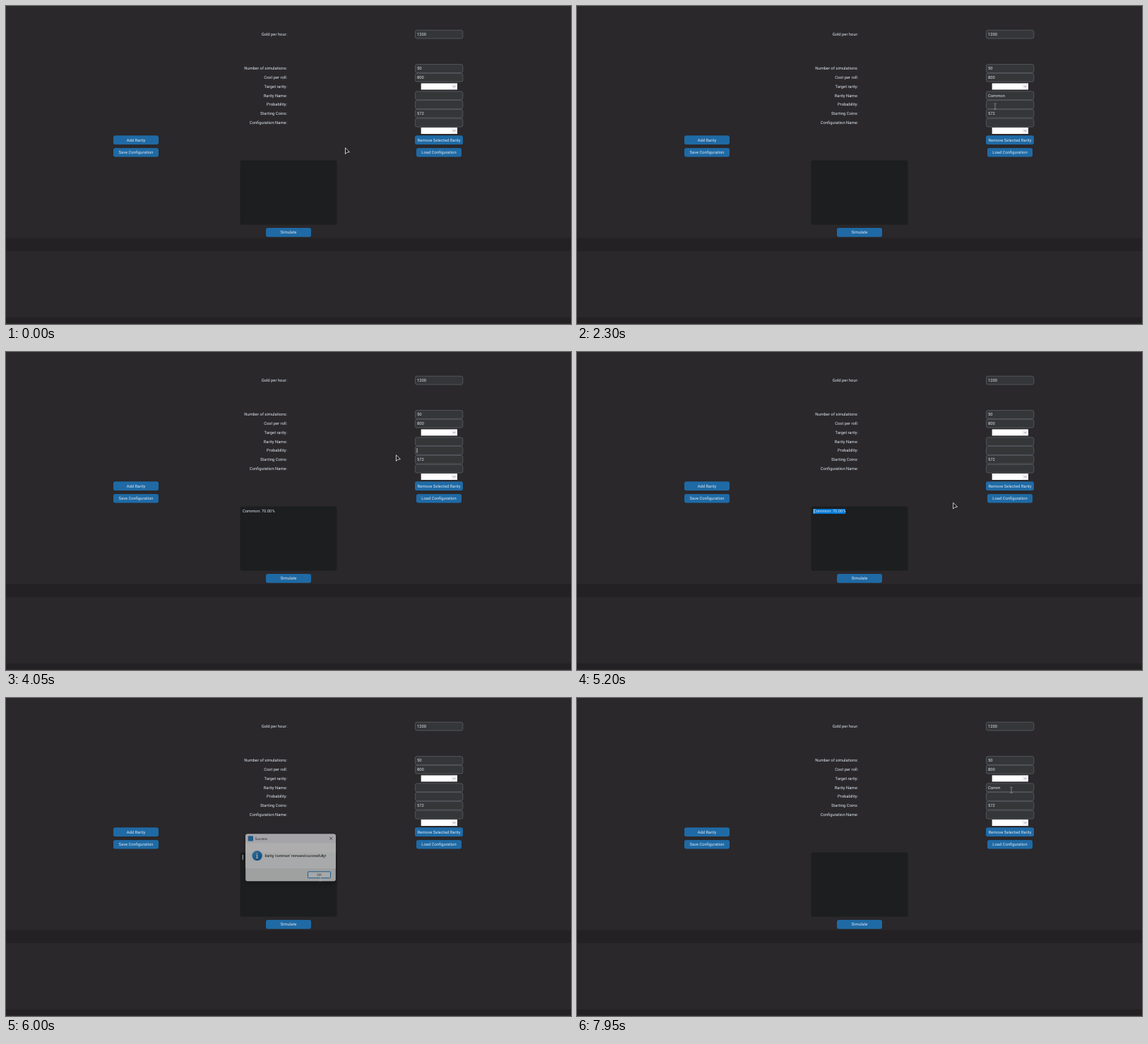
An HTML page for the animation above (8000 ms loop, 800x450 px).

```html
<!DOCTYPE html>
<html lang="en">
<head>
<meta charset="utf-8">
<title>Roll simulator</title>
<style>
html, body { margin: 0; width: 100%; height: 100%; overflow: hidden; background: #2a282b; }
svg { display: block; width: 100vw; height: 100vh; }
text { font: 5.83px Roboto, sans-serif; fill: #dce4ee; text-rendering: geometricPrecision; white-space: pre; }
#dialog text { font: 4.9px "Open Sans", sans-serif; fill: #1a1a1a; }
#dialog .info { font: bold 10px "Noto Serif", serif; fill: #fff; }
</style>
</head>
<body>
<svg viewBox="0 0 800 450" xmlns="http://www.w3.org/2000/svg">
  <defs>
    <linearGradient id="blue" x1="0" y1="0" x2="1" y2="1">
      <stop offset="0" stop-color="#3aa0e6"/><stop offset="1" stop-color="#0a5fae"/>
    </linearGradient>
    <filter id="soft" x="-20%" y="-30%" width="140%" height="170%"><feGaussianBlur stdDeviation="3.5"/></filter>
  </defs>
  <rect width="800" height="450" fill="#2a282b"/>
  <rect y="328.5" width="800" height="18.5" fill="#232124"/>
  <rect y="440.5" width="800" height="9.5" fill="#232124"/>
  <rect y="449" width="800" height="1" fill="#302d2d"/>
  <g id="form"></g>
  <rect x="331.5" y="218.6" width="137" height="90.8" rx="2.7" fill="#1c1e1f"/>
  <rect id="mark" x="335" y="222" width="45" height="7" fill="#0078d7"/>
  <text id="item" x="335" y="227.4">Common: 70.00%</text>
  <text id="name" x="582" y="128.8"></text>
  <text id="prob" x="582" y="141.6"></text>
  <rect id="caret" width=".8" height="6.8" fill="#dce4ee"/>
  <g id="dialog">
    <rect x="338.5" y="195" width="129" height="67" rx="3" fill="#000" opacity=".5" filter="url(#soft)"/>
    <rect x="338.4" y="192" width="129.2" height="67.6" rx="2.8" fill="#f0f0f0"/>
    <path d="M338.4 205V194.8a2.8 2.8 0 0 1 2.8-2.8h123.6a2.8 2.8 0 0 1 2.8 2.8V205z" fill="#f3f1f6"/>
    <rect x="338.4" y="205" width="129.2" height="36.2" fill="#fff"/>
    <rect x="342" y="194.8" width="7.4" height="7.4" rx="1" fill="#1d7cc4"/>
    <text x="352" y="200.3">Success</text>
    <path d="M458.8 196.2l4.2 4.2m0-4.2l-4.2 4.2" stroke="#222" stroke-width=".7"/>
    <circle cx="355" cy="223.2" r="7.2" fill="url(#blue)"/>
    <text class="info" x="355" y="226.9" text-anchor="middle">i</text>
    <text x="366" y="225.1" stroke="#1a1a1a" stroke-width=".12">Rarity 'common' removed successfully!</text>
    <rect x="427.8" y="246" width="32.4" height="9" rx="1" fill="#fdfdfd" stroke="#0078d4" stroke-width=".9"/>
    <text x="444" y="252.3" text-anchor="middle">OK</text>
  </g>
  <path id="arrow" d="M.2.3V8.9L2.4 6.6 6 6.1z" fill="#0b0b0b" stroke="#fff" stroke-width=".8" stroke-linejoin="round"/>
  <path id="beam" d="M-1.7-4H-.5L0-3.5.5-4H1.7M0-3.5V3.5M-1.7 4H-.5L0 3.5.5 4H1.7" fill="none" stroke="#b4b4b6" stroke-width=".6"/>
</svg>
<script>
const NS = "http://www.w3.org/2000/svg";
const $ = id => document.getElementById(id);
const form = $("form"), LOOP = 8000, STEP = 50;

function add(tag, attrs, label) {
  const el = document.createElementNS(NS, tag);
  for (const k in attrs) el.setAttribute(k, attrs[k]);
  if (label) el.textContent = label;
  return form.appendChild(el);
}
const label = (text, x, y, anchor) => add("text", { x, y: y + 2.05, "text-anchor": anchor }, text);

function entry(y, value) {
  add("rect", { x: 579.4, y: y - 5.8, width: 67.4, height: 11.8, rx: 2.4,
    fill: "#343638", stroke: "#565b5e", "stroke-width": .9 });
  label(value, 582, y, "start");
}
function combo(y) {
  add("rect", { x: 587.7, y, width: 51.3, height: 9, fill: "#fff" });
  add("rect", { x: 630.5, y: y + .4, width: 8.1, height: 8.2, fill: "#f2f0f5" });
  add("path", { d: `M633.1 ${y + 3.8}l1.5 1.5 1.5-1.5`, fill: "none", stroke: "#555", "stroke-width": .6 });
}
function button(text, cx, cy, w) {
  const box = add("rect", { x: cx - w / 2, y: cy - 6.3, width: w, height: 12.6, rx: 2.7, fill: "#1f6aa5" });
  label(text, cx, cy, "middle");
  return box;
}

const rows = [["Gold per hour:", 40, "1200"], ["Number of simulations:", 88.4, "50"],
  ["Cost per roll:", 101.1, "800"], ["Target rarity:", 113.9], ["Rarity Name:", 126.7, ""],
  ["Probability:", 139.4, ""], ["Starting Coins:", 152.2, "572"], ["Configuration Name:", 165, ""]];
for (const [text, y, value] of rows) {
  label(text, 398, y, "end");
  if (value !== undefined) entry(y, value);
}
combo(109.4);
combo(172);
const addBtn = button("Add Rarity", 184, 189.6, 64);
const removeBtn = button("Remove Selected Rarity", 613, 189.6, 68);
button("Save Configuration", 184, 207.2, 64);
button("Load Configuration", 613, 207.2, 64);
button("Simulate", 400, 320.4, 64);

// Pointer path: time, x, y
const path = [[0, 480.3, 200.5], [50, 480.3, 200.5], [500, 601, 126], [1600, 601, 126],
  [1850, 594, 151], [2000, 592, 142], [2850, 592, 142], [3050, 430, 228], [3250, 186, 191],
  [3400, 186, 191], [3750, 330, 200], [4050, 552.3, 145.5], [4500, 383, 226], [4600, 383, 226],
  [4850, 182, 227], [5200, 532.5, 213], [5400, 586, 192.5], [5650, 586, 192.5],
  [5900, 445.4, 255], [6150, 445.4, 255], [6500, 615, 130.3], [8000, 615, 130.3]];

function slope(i, k) {
  const a = path[i - 1], b = path[i], c = path[i + 1];
  if (!a || !c || a[k] === b[k] || c[k] === b[k] || (b[k] - a[k]) * (c[k] - b[k]) < 0) return 0;
  return (c[k] - a[k]) / (c[0] - a[0]);
}
function pointer(t, k) {
  let i = 0;
  while (i < path.length - 2 && t >= path[i + 1][0]) i++;
  const a = path[i], b = path[i + 1], d = b[0] - a[0], u = (t - a[0]) / d, v = 1 - u;
  return v * v * (1 + 2 * u) * a[k] + u * u * (3 - 2 * u) * b[k]
    + d * u * v * (v * slope(i, k) - u * slope(i + 1, k));
}

const within = (t, ...spans) => spans.some(([a, b]) => t >= a && t < b);
const typed = (text, t, times) => text.slice(0, times.filter(at => t >= at).length);
const show = (el, on) => el.setAttribute("display", on ? "inline" : "none");
const place = (el, x, y) => el.setAttribute("transform", `translate(${x} ${y})`);

function caretAt(t) {
  if (within(t, [500, 750], [6700, 7150], [7450, 7600])) return [581.6, 123.3];
  if (within(t, [1950, 2300])) return [581.6, 136];
  if (within(t, [2550, 2750])) return [585, 136];
  if (within(t, [2750, 3200])) return [588.2, 136];
  if (within(t, [3500, 4100], [4400, 4550])) return [581.6, 136];
  if (within(t, [4700, 5300], [5600, 6200], [6500, 6700])) return [334.8, 222];
  return null;
}

function draw(t) {
  const x = pointer(t, 1), y = pointer(t, 2);
  $("name").textContent = t < 3300 ? typed("Common", t, [850, 950, 1000, 1100, 1250, 1350])
    : typed("Comm", t, [7600, 7700, 7800, 7900]);
  $("prob").textContent = t < 3300 ? typed("70", t, [2450, 2750]) : "";
  show($("item"), within(t, [3300, 5450]));
  show($("mark"), within(t, [4650, 5450]));
  $("mark").setAttribute("x", Math.max(335, Math.min(380, x)));
  $("mark").setAttribute("width", t < 4850 ? 380 - Math.max(335, Math.min(380, x)) : 45);
  if (t >= 4850) $("mark").setAttribute("x", 335);

  const caret = caretAt(t);
  show($("caret"), caret);
  if (caret) place($("caret"), ...caret);

  addBtn.setAttribute("fill", within(t, [3200, 3450]) ? "#144870" : "#1f6aa5");
  removeBtn.setAttribute("fill", within(t, [5350, 5450]) ? "#144870" : "#1f6aa5");

  const open = within(t, [5450, 6050]);
  const fade = t < 5500 ? .5 : t < 6000 ? 1 : .62;
  const size = t < 5500 ? .95 : t < 6000 ? 1 : .988;
  show($("dialog"), open);
  $("dialog").setAttribute("opacity", fade);
  $("dialog").setAttribute("transform", `translate(403 225.8) scale(${size}) translate(-403 -225.8)`);

  const overEntry = x > 579 && x < 647 && y > 120.5 && y < 171;
  const overList = x > 331 && x < 468 && y > 218 && y < 309 && !within(t, [5450, 6000]);
  const beam = overEntry || overList || within(t, [4600, 4900]);
  show($("beam"), beam);
  show($("arrow"), !beam);
  place($(beam ? "beam" : "arrow"), x, y);
}

const start = performance.now();
function tick() {
  const t = (performance.now() - start) % LOOP;
  draw(Math.floor(t / STEP) * STEP);
  requestAnimationFrame(tick);
}
draw(0);
requestAnimationFrame(tick);
</script>
</body>
</html>
```
